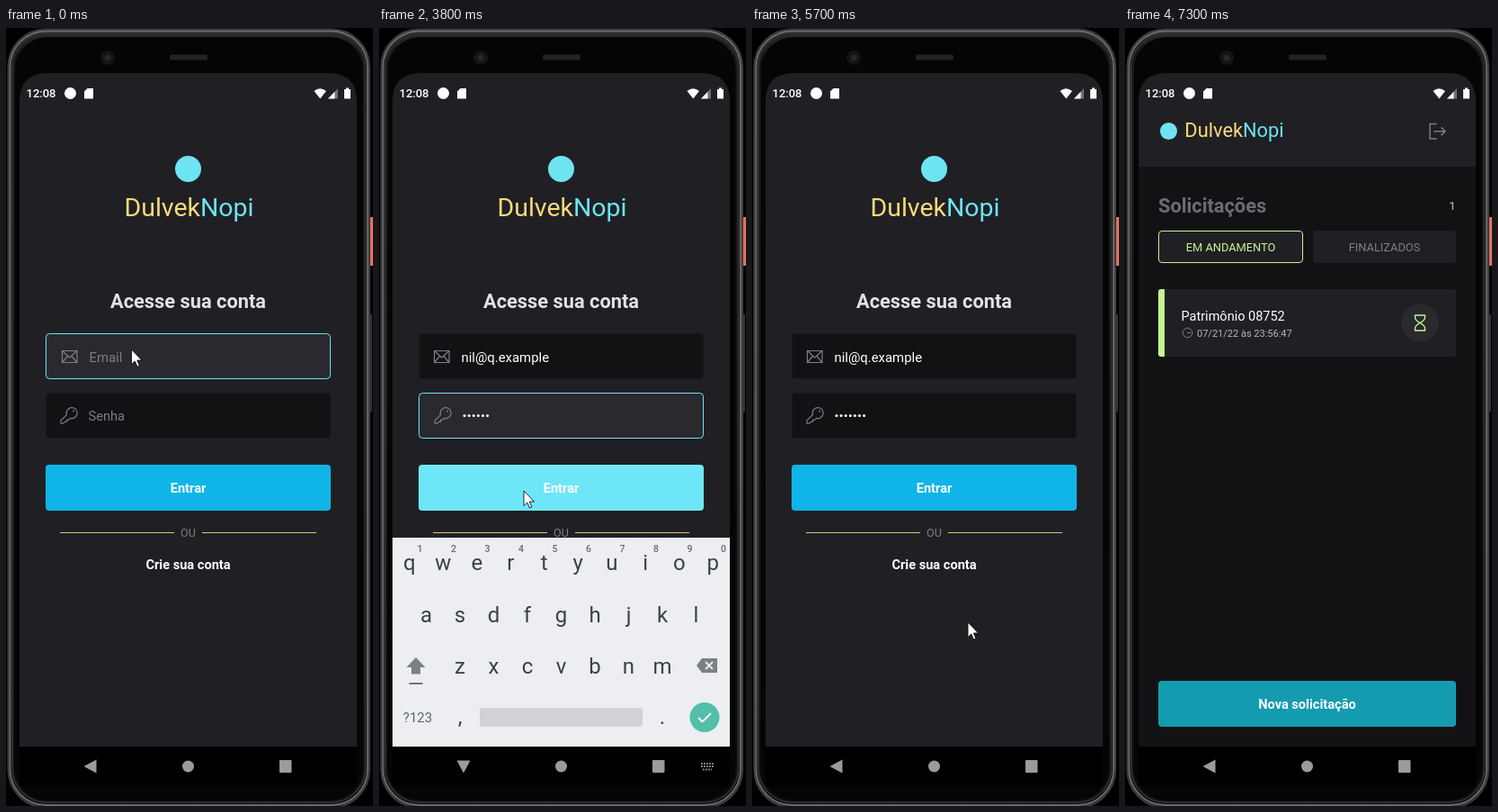
Animation of 408x864 px, one loop 7500 ms. Source, as an HTML page:

```html
<!DOCTYPE html>
<html lang="pt">
<head>
<meta charset="utf-8">
<title>Login</title>
<style>
  html, body { margin: 0; width: 100%; height: 100%; overflow: hidden; background: #000; }
  svg { display: block; width: 408px; height: 864px; font-family: Roboto, Arial, sans-serif; }
  .mid { text-anchor: middle; }
  .bold { font-weight: 700; }
  .line { fill: none; stroke: #7c7c8a; stroke-width: 1.2; stroke-linejoin: round; stroke-linecap: round; }
</style>
</head>
<body>
<svg viewBox="0 0 408 864">
  <defs>
    <clipPath id="screenClip"><path d="M15 842V82Q15 50 47 50H358Q390 50 390 82V842Z"/></clipPath>
    <clipPath id="keyClip"><rect x="15" y="50" width="375" height="748"/></clipPath>
    <linearGradient id="rim" x2="0" y2="1">
      <stop offset="0" stop-color="#2c2c2c"/><stop offset=".03" stop-color="#161616"/><stop offset="1" stop-color="#0c0c0c"/>
    </linearGradient>
  </defs>

  <rect width="408" height="864"/>
  <rect x="404.500" y="210" width="5" height="54" rx="1" fill="#e5705f"/>
  <rect x="404" y="318" width="3" height="108" rx="1" fill="#333"/>
  <g fill="none">
    <rect x="2.500" y="1.500" width="401.500" height="864" rx="42" fill="#2a2a2a" stroke="#3c3c3c" stroke-width="2"/>
    <rect x="4.500" y="3.500" width="397.500" height="859.500" rx="40" fill="url(#rim)" stroke="#6c6c6c" stroke-width="1.800"/>
    <rect x="7" y="6" width="392.500" height="854" rx="38" stroke="#2e2e2e" stroke-width="2"/>
  </g>
  <rect x="10" y="10" width="386.500" height="847" rx="36" fill="#050505"/>
  <circle cx="113" cy="33" r="8" fill="#141416"/>
  <circle cx="113" cy="33" r="3.5" fill="#26262b"/>
  <rect x="182" y="29.5" width="42" height="6" rx="2" fill="#232323"/>

  <g clip-path="url(#screenClip)">
    <g id="login">
      <rect x="15" y="50" width="375" height="748" fill="#202024"/>
      <circle cx="202.5" cy="156.5" r="14.5" fill="#6ee4f2"/>
      <g font-size="28.5">
        <text x="216" y="209" text-anchor="end" fill="#fbda7c">Dulvek</text>
        <text x="216" y="209" fill="#6ee4f2">Nopi</text>
      </g>
      <text class="mid bold" x="202.5" y="311" font-size="21.8" fill="#e1e1e6">Acesse sua conta</text>

      <rect id="emailBox" x="44.5" y="339.5" width="316" height="50" rx="4"/>
      <g id="emailBody">
        <path class="line" d="M61.5 358.5h16.5v13h-16.5zl8.25 7.5 8.25-7.5M61.5 371.5l5.5-6.5M78 371.5l-5.5-6.5"/>
        <text id="emailText" x="91.5" y="370.5" font-size="14.9"></text>
      </g>
      <rect id="passBox" x="44.5" y="405.5" width="316" height="50" rx="4"/>
      <g id="passBody">
        <path class="line" d="M67.500 429.500a6 6 0 1 1 4 3.800l-2 2h-2v2h-2l-1.800 1.800h-2.700v-3.200z"/>
        <circle cx="75" cy="425.500" r="1" fill="#7c7c8a"/>
        <text id="passHint" x="91.5" y="436.2" font-size="14.6" fill="#7c7c8a">Senha</text>
        <g id="dots" fill="#fff"></g>
      </g>

      <rect id="enter" x="44" y="485" width="317" height="51" rx="4"/>
      <text id="enterText" class="mid bold" x="202.5" y="515.800" font-size="14.6" fill="#fff">Entrar</text>
      <path id="enterSpin" d="M202.5 503a8 8 0 1 1-8 8" fill="none" stroke="#fff" stroke-width="2"/>

      <path d="M60 560.5H187M218 560.5H345" stroke="#dcc274"/>
      <text class="mid" x="202.5" y="565" font-size="12.6" fill="#7c7c8a">OU</text>
      <text class="mid bold" x="202.5" y="600.5" font-size="14.6" fill="#fff">Crie sua conta</text>
    </g>

    <g id="home">
      <rect x="15" y="50" width="375" height="748" fill="#121214"/>
      <rect x="15" y="50" width="375" height="104" fill="#202024"/>
      <circle cx="48.5" cy="114.5" r="9.5" fill="#6ee4f2"/>
      <g font-size="21.8">
        <text x="131" y="121" text-anchor="end" fill="#fbda7c">Dulvek</text>
        <text x="131" y="121" fill="#6ee4f2">Nopi</text>
      </g>
      <path class="line" style="stroke-width:1.5" d="M346 106.5h-7v16.5h7M344 114.700h12m-4-4l4 4-4 4"/>
      <text class="bold" x="37" y="204.500" font-size="21.8" fill="#6c6c76">Solicitações</text>
      <text id="count" x="367.5" y="202" text-anchor="end" font-size="13" fill="#c4c4cc"></text>
      <rect x="37.5" y="225.5" width="160" height="35" rx="3.5" fill="#202024" stroke="#c4f58e"/>
      <rect x="209" y="225" width="159" height="36" rx="3.5" fill="#202024"/>
      <g class="mid" font-size="12.8">
        <text x="117.5" y="248" fill="#c4f58e">EM ANDAMENTO</text>
        <text x="288.5" y="248" fill="#7c7c8a">FINALIZADOS</text>
      </g>
      <path id="listSpin" d="M202.5 529a14 14 0 1 1-14 14" fill="none" stroke="#c4f58e" stroke-width="2.5"/>
      <g id="card">
        <rect x="37" y="290" width="331" height="75" rx="3" fill="#202024"/>
        <path d="M44 290V365H40Q37 365 37 362V293Q37 290 40 290Z" fill="#c4f58e"/>
        <text x="62.5" y="325" font-size="14.5" fill="#fff">Patrimônio 08752</text>
        <circle class="line" cx="69.5" cy="338.5" r="5.3" style="stroke-width:1"/>
        <path class="line" d="M69.5 338.5h3" style="stroke-width:1"/>
        <text x="80" y="342.5" font-size="11" fill="#b5b5bd">07/21/22 às 23:56:47</text>
        <circle cx="328" cy="327.5" r="21" fill="#29292e"/>
        <path d="M322.5 319h11v2.5q0 3-5.5 6 5.5 3 5.5 6v2.5h-11v-2.5q0-3 5.5-6-5.5-3-5.5-6z"
              fill="none" stroke="#c4f58e" stroke-width="1.4" stroke-linejoin="round"/>
      </g>
      <rect x="37" y="725" width="331" height="51" rx="4" fill="#149bb0"/>
      <text class="mid bold" x="202.5" y="756" font-size="14.6" fill="#fff">Nova solicitação</text>
    </g>

    <g clip-path="url(#keyClip)"><g id="keyboard">
      <rect x="15" y="566" width="375" height="232" fill="#eceef2"/>
      <g id="keys" class="mid" fill="#3b4145"></g>
      <path id="shift" d="M41 699l10.5 11h-5.5v7.5h-10v-7.5h-5.5z"/>
      <path d="M33.5 728h15" stroke="#70757a" stroke-width="2"/>
      <path d="M353 708l6-8h17v16h-17z" fill="#7b8084"/>
      <path d="M363 704l8 8m0-8l-8 8" stroke="#eceef2" stroke-width="1.8"/>
      <text class="mid" x="43" y="771" font-size="15" fill="#5f6468">?123</text>
      <rect x="112" y="755" width="181" height="21" rx="3" fill="#d0d2d5"/>
      <g class="mid" font-size="24" fill="#3b4145"><text x="90" y="773">,</text><text x="315" y="773">.</text></g>
      <circle cx="362" cy="765.5" r="16.5" fill="#52bfa8"/>
      <path d="M355 766l4.5 4.5 9.5-9.5" fill="none" stroke="#fff" stroke-width="1.8"/>
    </g></g>

    <g id="alert">
      <rect x="15" y="50" width="375" height="748" opacity=".6"/>
      <rect x="39" y="372" width="327" height="148.5" rx="2" fill="#fff"/>
      <text class="bold" x="61" y="408" font-size="18">Entrar</text>
      <text x="61" y="436" font-size="14.5" fill="#222">E-mail ou senha inválido.</text>
      <text class="bold" x="316.5" y="497" font-size="12.8">OK</text>
    </g>

    <rect x="15" y="798" width="375" height="44"/>
    <g fill="#9b9b9b">
      <path id="back" d="M-7.5 0L6.5-7.5V7.5Z"/>
      <circle cx="202.5" cy="820" r="6.5"/>
      <rect x="304" y="813" width="13.5" height="14" rx="1"/>
      <path id="keyIcon" d="M358 817h14M358 820h14M360 823.5h10" stroke="#8a8a8a" stroke-width="1.8" stroke-dasharray="1.8 1.2"/>
    </g>

    <g fill="#fff">
      <text x="22.5" y="77.3" font-size="13" font-weight="500">12:08</text>
      <circle cx="71.5" cy="72.5" r="6.5"/>
      <path d="M90.5 67h6.5v11.5h-10v-8z"/>
      <path d="M342.5 70q6.5-5.5 13.500 0l-6.7 8.5z"/>
      <path d="M358 78.5l11-11.5v11.500z" opacity=".35"/>
      <path d="M358 78.5l7.500-7.800v7.800z"/>
      <path d="M376 68h2v-1.5h3v1.5h2v10.5h-7z"/>
    </g>
  </g>

  <path id="pointer" d="M0 0V16.5L3.8 13 6.4 19 8.9 18 6.3 12H11.5Z" fill="#fff" stroke="#111" stroke-width=".9"/>
</svg>

<script>
const LOOP = 7500, STEP = 100;
const EMAIL = 'nil@q.example';
const ROWS = ['qwertyuiop', 'asdfghjkl', 'zxcvbnm'];
const ROW_X = [33.75, 52.5, 90];
const PITCH = 37.5;
const el = Object.fromEntries([...document.querySelectorAll('[id]')].map(n => [n.id, n]));

function add(parent, tag, attrs, text = '') {
  const node = document.createElementNS('http://www.w3.org/2000/svg', tag);
  for (const key in attrs) node.setAttribute(key, attrs[key]);
  node.textContent = text;
  return parent.appendChild(node);
}

const letters = ROWS.flatMap((row, r) => [...row].map((char, i) => ({
  char, node: add(el.keys, 'text', { x: ROW_X[r] + i * PITCH, y: 602 + r * 57.5, 'font-size': 24 })
})));
for (let i = 0; i < 10; i++) {
  add(el.keys, 'text', { x: 45.5 + i * PITCH, y: 582, 'font-size': 10.5, 'font-weight': 500, opacity: .75 }, (i + 1) % 10);
}
const dots = Array.from({ length: 7 }, (_, i) => add(el.dots, 'circle', { cx: 94 + i * 5.1, cy: 430.5, r: 1.5 }));

// Keyframes are [time, ...values], linear in between.
function track(t, frames) {
  const next = frames.findIndex(f => f[0] > t);
  if (next === 0) return frames[0].slice(1);
  if (next < 0) return frames.at(-1).slice(1);
  const [a, b] = [frames[next - 1], frames[next]];
  const p = (t - a[0]) / (b[0] - a[0]);
  return a.slice(1).map((v, i) => v + (b[i + 1] - v) * p);
}

const POINTER = [
  [0, 139.5, 357], [2100, 139.5, 357], [2200, 188, 423], [3400, 188, 423], [3700, 161, 514],
  [3900, 161, 514], [4200, 178, 458], [4400, 323, 488], [4500, 323, 488], [4700, 190, 456],
  [4900, 180, 430], [5400, 180, 430], [5600, 240, 660], [5800, 240, 660], [6000, 310.5, 516]
];
const EMAIL_COUNT = [[900, 0], [1600, 4], [2000, 13]];
const PASS_COUNT = [[3000, 0], [3500, 6], [4900, 6], [5000, 0], [5400, 7]];
const KEYBOARD = [[2200, 0], [2400, 1], [5500, 1], [5700, 0]];
const BACK_TURN = [[2200, 0], [2400, -73], [2500, -90], [5500, -90], [5700, 0]];
const ALERT = [[3900, 0], [4100, 1], [4500, 1], [4600, 0]];

const show = (node, on) => node.setAttribute('display', on ? 'inline' : 'none');
const within = (t, from, to) => t >= from && t < to;

function paintField(box, body, focused) {
  box.setAttribute('fill', focused ? '#29292e' : '#121214');
  box.setAttribute('stroke', focused ? '#6ee4f2' : 'none');
  body.setAttribute('transform', `translate(${focused ? 1 : 0} 0)`);
}

function render(t) {
  const atHome = t >= 6700, loaded = t >= 7100;
  show(el.login, !atHome);
  show(el.home, atHome);
  show(el.card, loaded);
  show(el.listSpin, !loaded);
  el.count.textContent = loaded ? 1 : 0;
  el.listSpin.setAttribute('transform', `rotate(${t * .4} 202.5 543)`);

  paintField(el.emailBox, el.emailBody, t < 2200);
  paintField(el.passBox, el.passBody, within(t, 2200, 5600));
  const typed = EMAIL.slice(0, Math.round(track(t, EMAIL_COUNT)[0]));
  el.emailText.textContent = typed || 'Email';
  el.emailText.setAttribute('fill', typed ? '#fff' : '#7c7c8a');
  const count = Math.round(track(t, PASS_COUNT)[0]);
  show(el.passHint, !count);
  dots.forEach((dot, i) => show(dot, i < count));

  const pressed = within(t, 3800, 4000) || within(t, 6100, 6300);
  const loading = within(t, 6300, 6700);
  el.enter.setAttribute('fill', pressed ? '#6de7f7' : '#0fb5e6');
  el.enter.setAttribute('opacity', loading ? .5 : 1);
  show(el.enterText, !loading);
  show(el.enterSpin, loading);
  el.enterSpin.setAttribute('transform', `rotate(${t * .4} 202.5 511)`);

  const [raised] = track(t, KEYBOARD);
  const upper = t < 3100;
  show(el.keyboard, raised > 0);
  show(el.keyIcon, raised > 0);
  el.keyboard.setAttribute('transform', `translate(0 ${232 * (1 - raised)})`);
  letters.forEach(({ char, node }) => node.textContent = upper ? char.toUpperCase() : char);
  el.shift.setAttribute('fill', upper ? '#52bfa8' : '#7b8084');
  el.back.setAttribute('transform', `translate(94 820) rotate(${track(t, BACK_TURN)[0]})`);

  const [alpha] = track(t, ALERT);
  show(el.alert, alpha > 0);
  el.alert.setAttribute('opacity', alpha);

  show(el.pointer, !atHome);
  el.pointer.setAttribute('transform', `translate(${track(t, POINTER)})`);
}

const start = performance.now();
function tick() {
  const t = (performance.now() - start) % LOOP;
  render(Math.floor(t / STEP) * STEP);
  requestAnimationFrame(tick);
}
tick();
</script>
</body>
</html>
```
